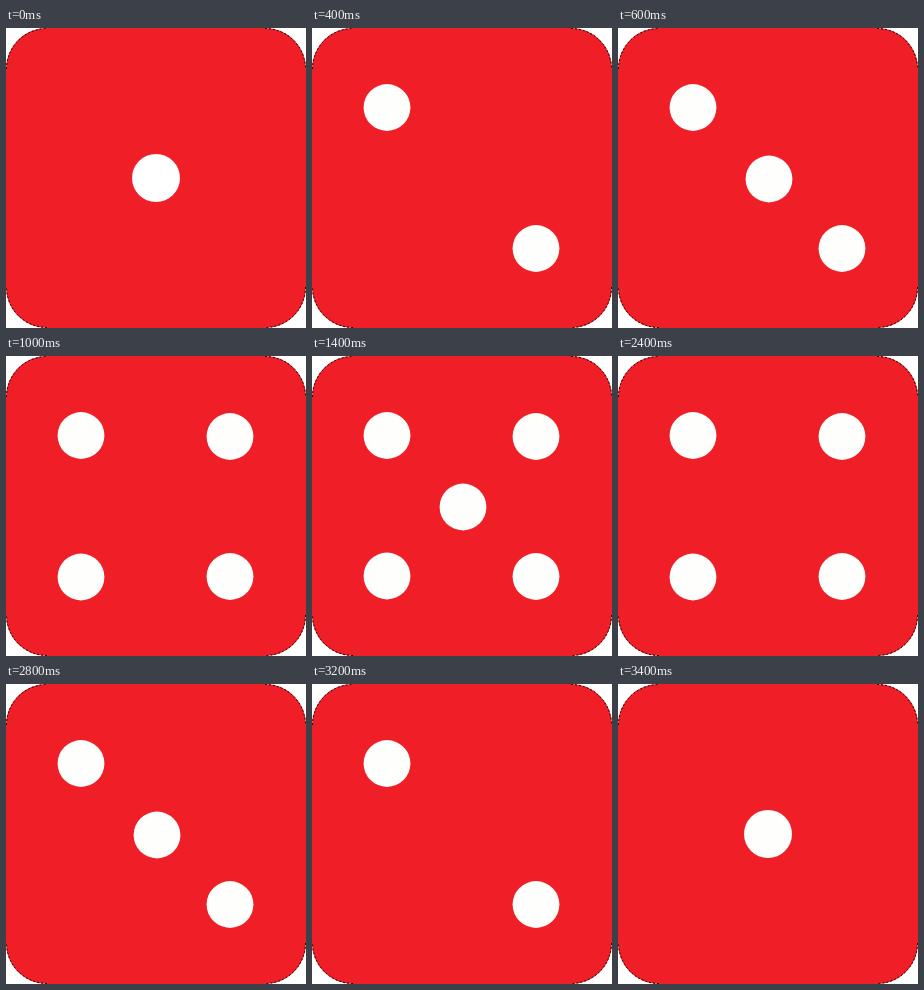
Write an HTML page that moves like this. It is 300 px wide and 300 px high and loops after 3.6 s.

```html
<!DOCTYPE html>
<html lang="en">
<head>
<meta charset="utf-8">
<title>Die</title>
<style>
  html, body { margin: 0; width: 100%; height: 100%; overflow: hidden; background: #fff; }
  svg { display: block; width: 100%; height: 100%; }
</style>
</head>
<body>
<svg viewBox="0 0 300 300">
  <rect width="300" height="300" rx="41" fill="#f01e26"/>
  <path d="M.5 41A40.5 40.5 0 0 1 41 .5M259 .5A40.5 40.5 0 0 1 299.5 41M299.5 259A40.5 40.5 0 0 1 259 299.5M41 299.5A40.5 40.5 0 0 1 .5 259"
    fill="none" stroke="#000" stroke-dasharray="2 2"/>
  <g id="pips"></g>
</svg>
<script>
const LOOP = 3600;
const pips = document.getElementById('pips');

// Pip centres for each face
const TL = [75, 79.5], TR = [224, 80.5], BR = [224, 220.5], MID = [151, 151];
const faces = {
  1: [[150, 150]],
  2: [TL, BR],
  3: [TL, MID, BR],
  4: [TL, TR, [75, 221], BR],
  5: [TL, TR, MID, [75, 220], BR],
  6: [75, 151, 224].flatMap(x => [[x, 79.5], [x, 219.5]])
};

// [start time, face]
const steps = [
  [0, 1], [400, 2], [600, 3], [1000, 4], [1400, 5], [1600, 6],
  [2200, 5], [2400, 4], [2800, 3], [3200, 2], [3400, 1]
];

let shown = 0;

function draw(now) {
  const t = now % LOOP;
  const face = steps.findLast(([start]) => start <= t)[1];
  if (face !== shown) {
    shown = face;
    const r = face === 1 ? 24 : 23.4;
    pips.innerHTML = faces[face].map(([x, y]) => `<circle cx="${x}" cy="${y}" r="${r}"/>`).join('');
  }
  pips.setAttribute('fill', t < 200 ? '#fff' : '#fefefc');
}

const began = performance.now();
function tick() {
  draw(performance.now() - began);
  requestAnimationFrame(tick);
}
tick();
</script>
</body>
</html>
```
